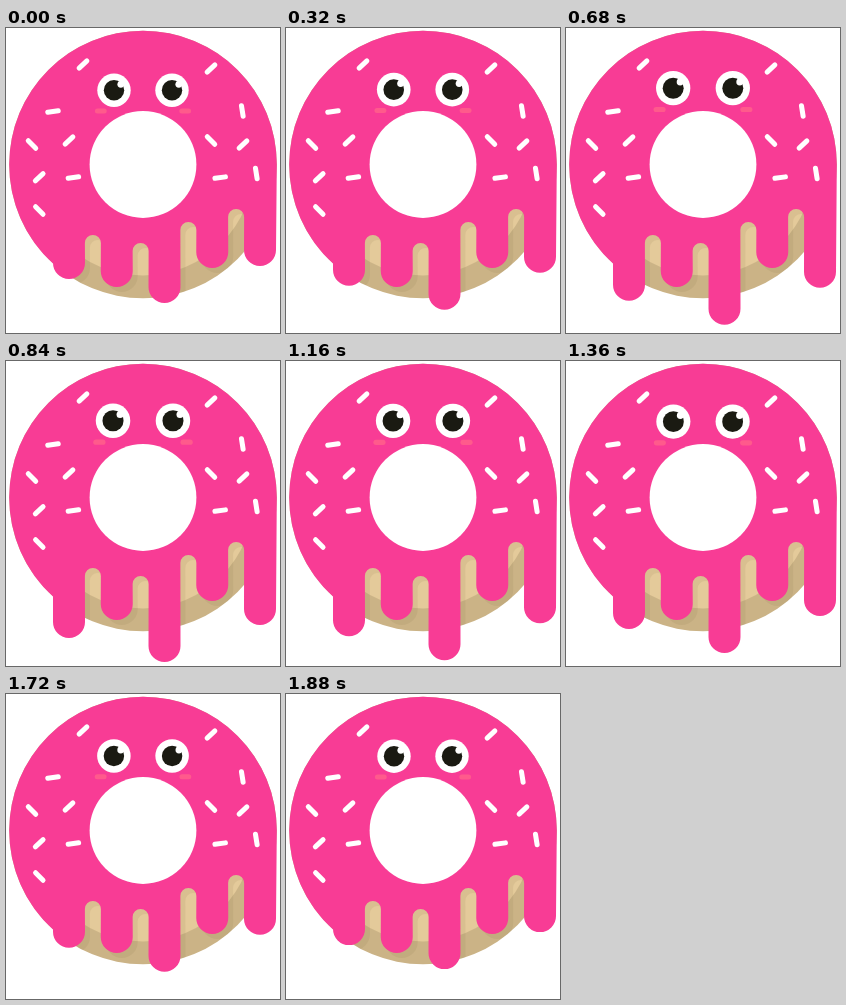
These frames come from a looping animation (274 by 305 pixels, 1920 ms). An HTML page with a canvas:

```html
<!DOCTYPE html>
<html lang="en">
<head>
<meta charset="utf-8">
<title>Dripping donut</title>
<style>
  html, body { margin: 0; width: 100%; height: 100%; overflow: hidden; background: #fff; }
  canvas { display: block; }
</style>
</head>
<body>
<canvas id="stage" width="274" height="305"></canvas>
<script>
const ctx = document.getElementById('stage').getContext('2d');
const LOOP = 1920, STEP = 40, DROP = 27;
const CX = 137, CY = 136.5, R = 133.8, HOLE = 53.4, SHADE = 111;
const PINK = '#f83c95', DOUGH = '#e4ca9a', CRUST = '#cbb386', INK = '#1a1a12', BLUSH = '#ff5a8c';

// Drips run right to left at even spacing; every other one stretches
const FIRST = 254, GAP = 47.75, DRIP_R = 16, ARCH_R = 8;
const tips = [222, 224, 259, 243, 235];
const arches = [189, 202, 223, 215];

// Sprinkle centres grouped by their tilt in degrees
const sprinkles = [
  { tilt: 45, at: [[26, 116.5], [33.3, 182.5], [205, 112.5]] },
  { tilt: -43, at: [[77, 36.5], [205, 40.5], [63, 112.5], [33.2, 149.3], [237, 116.5]] },
  { tilt: -8, at: [[47, 83.5], [67.4, 149.5], [214.2, 149.6]] },
  { tilt: 81, at: [[236.3, 83], [250.3, 145.5]] }
];

function disc(x, y, r, color) {
  ctx.fillStyle = color;
  ctx.beginPath();
  ctx.arc(x, y, r, 0, 2 * Math.PI);
  ctx.fill();
}

// Rounded stroke through a centre point
function dash(x, y, half, tilt, color) {
  const a = tilt * Math.PI / 180, dx = half * Math.cos(a), dy = half * Math.sin(a);
  ctx.lineWidth = 5;
  ctx.lineCap = 'round';
  ctx.strokeStyle = color;
  ctx.beginPath();
  ctx.moveTo(x - dx, y - dy);
  ctx.lineTo(x + dx, y + dy);
  ctx.stroke();
}

function icing(drop, color) {
  ctx.fillStyle = color;
  ctx.beginPath();
  ctx.arc(CX, CY, R, Math.PI, 2 * Math.PI);
  tips.forEach((y, i) => {
    const x = FIRST - i * GAP;
    ctx.arc(x, y + (i % 2 ? 0 : drop), DRIP_R, 0, Math.PI);
    if (i < arches.length) ctx.arc(x - GAP / 2, arches[i], ARCH_R, 0, Math.PI, true);
  });
  const left = FIRST - 4 * GAP - DRIP_R;
  ctx.arc(CX, CY, R, Math.PI - Math.acos((CX - left) / R), Math.PI);
  ctx.fill();
}

function dough(drop) {
  disc(CX, CY, R, CRUST);
  disc(CX, CY, SHADE, DOUGH);
  // soft shadow of the icing, kept inside the dough
  ctx.save();
  ctx.beginPath();
  ctx.arc(CX, CY, R, 0, 2 * Math.PI);
  ctx.clip();
  ctx.translate(5, 5);
  icing(drop, 'rgba(120, 95, 60, 0.1)');
  ctx.restore();
}

function face(scale) {
  ctx.save();
  ctx.translate(CX, CY);
  ctx.scale(scale, scale);
  for (const side of [-1, 1]) {
    const x = side * 29;
    dash(side * 42.2, -53.5, 3.4, 0, BLUSH);
    disc(x, -74.3, 16.7, '#fff');
    disc(x, -74.2, 10.2, INK);
    disc(x + 6.8, -80.2, 3.4, '#fff');
  }
  ctx.restore();
}

function draw(time) {
  const t = Math.floor((time % LOOP) / STEP) * STEP;
  const wave = (1 - Math.cos(2 * Math.PI * t / LOOP)) / 2;
  ctx.fillStyle = '#fff';
  ctx.fillRect(0, 0, 274, 305);
  dough(DROP * wave);
  icing(DROP * wave, PINK);
  disc(CX, CY, HOLE, '#fff');
  for (const { tilt, at } of sprinkles) {
    for (const [x, y] of at) dash(x, y, 5.3, tilt, '#fff');
  }
  face(1 + 0.035 * wave);
}

const start = performance.now();
function tick() {
  draw(performance.now() - start);
  requestAnimationFrame(tick);
}
tick();
</script>
</body>
</html>
```
